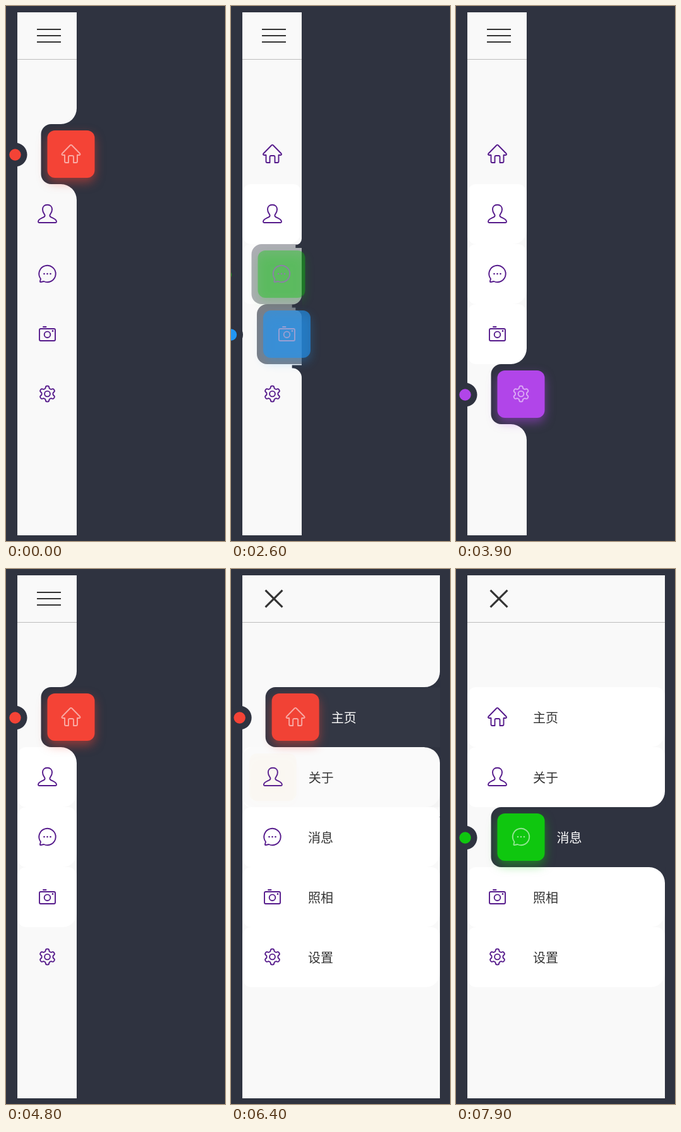
Recreate the animation shown at these times as an HTML page with a canvas. Size 347 px wide and 847 px high, loop 8000 ms.

```html
<!DOCTYPE html>
<html lang="zh">
<head>
<meta charset="utf-8">
<style>
html, body { margin: 0; width: 100%; height: 100%; overflow: hidden; background: #2f3340; }
canvas { display: block; width: 347px; height: 847px; }
</style>
</head>
<body>
<canvas id="stage"></canvas>
<script>
const DARK = '#2f3340', LEFT = 18, TOP = 187, ROW = 95, SHIFT = 37.5;
const LOOP = 8000, FRAME = 100;
const moves = [[800, 1200, 1], [1700, 2200, 2], [2400, 3000, 3], [3400, 3900, 4],
               [4300, 4800, 0], [6400, 6900, 1], [7300, 7900, 2]];
const OPEN = [5200, 5600];

// Icon paths are centred on 0,0
const gear = () => {
  let d = '';
  for (let i = 0; i < 120; i++) {
    const a = i * Math.PI / 60, r = 10.7 + 1.8 * Math.tanh(2 * Math.cos(6 * (a - Math.PI / 2)));
    d += (i ? 'L' : 'M') + r * Math.cos(a) + ' ' + r * Math.sin(a);
  }
  return d + 'Z' + dot(0, 0, 4.4);
};
const dot = (x, y, r) => `M${x + r} ${y}A${r} ${r} 0 1 1 ${x - r} ${y}A${r} ${r} 0 1 1 ${x + r} ${y}Z`;
const items = [
  { name: '主页', color: '#f44336', path: 'M-10 2H-13Q-15.5 1.5-14-.5L-1.3-13.5Q0-14.8 1.3-13.5L14-.5Q15.5 1.5 13 2H10V12Q10 14 8 14H4V5Q4 3 2 3H-2Q-4 3-4 5V14H-8Q-10 14-10 12Z' },
  { name: '关于', color: '#ffa117', path: 'M0-14.2C5-14.2 7.5-11 7.5-7C7.5-2 5-.5 4 2C3 5 6 5.5 9 6.8C13 8.5 14.5 10 14.5 12.6Q14.5 14 13 14H-13Q-14.5 14-14.5 12.6C-14.5 10-13 8.5-9 6.8C-6 5.5-3 5-4 2C-5-.5-7.5-2-7.5-7C-7.5-11-5-14.2 0-14.2Z' },
  { name: '消息', color: '#0fc70f', path: 'M-10.5 8A13.2 13.2 0 1 1-5.5 12L-10.5 13Q-12 13-11.5 11.5Z', fill: dot(-5, 0, 1.3) + dot(0, 0, 1.3) + dot(5, 0, 1.3) },
  { name: '照相', color: '#2196f3', path: 'M-10.5-8H10.5Q12.5-8 12.5-6V9Q12.5 11 10.5 11H-10.5Q-12.5 11-12.5 9V-6Q-12.5-8-10.5-8ZM-6.5-11H-2' + dot(0, 1.2, 4.8), fill: dot(8.5, -4.5, 1.4) },
  { name: '设置', color: '#b145e9', path: gear() }
];
for (const it of items) {
  it.line = new Path2D(it.path);
  it.solid = new Path2D(it.fill || '');
}

const canvas = document.getElementById('stage'), c = canvas.getContext('2d');
const dpr = window.devicePixelRatio || 1;
canvas.width = 347 * dpr;
canvas.height = 847 * dpr;

// The CSS "ease" curve: cubic-bezier(.25, .1, .25, 1)
function ease(u) {
  if (u <= 0) return 0;
  if (u >= 1) return 1;
  let lo = 0, hi = 1;
  for (let i = 0; i < 20; i++) {
    const s = (lo + hi) / 2, v = 1 - s;
    if (.75 * v * v * s + .75 * v * s * s + s * s * s < u) lo = s; else hi = s;
  }
  const v = 1 - lo;
  return .3 * v * v * lo + 3 * v * lo * lo + lo * lo * lo;
}
const progress = (t, from, to) => ease((t - from + 20) / (to - from + 20));
const mix = (a, b, p) => a + (b - a) * p;

function rect(x, y, w, h, color, radii = 0) {
  c.fillStyle = color;
  c.beginPath();
  c.roundRect(x, y, w, h, radii);
  c.fill();
}
function disc(x, y, r, color) {
  c.fillStyle = color;
  c.beginPath();
  c.arc(x, y, r, 0, 7);
  c.fill();
}

// Rounded cut above (dir -1) or below (dir 1) the active row
function corner(right, y, dir, p) {
  const r = 25 * p, band = 20 * p * (1 - p);
  c.fillStyle = DARK;
  c.beginPath();
  c.moveTo(right - r, y - dir * band);
  c.lineTo(right - r, y);
  c.arcTo(right, y, right, y + dir * r, r);
  c.lineTo(right + .5, y + dir * r);
  c.lineTo(right + .5, y - dir * band);
  c.fill();
}

function menuButton(open) {
  c.fillStyle = '#333';
  for (const k of [-1, 0, 1]) {
    c.save();
    c.translate(68, 47 + 10 * k * (1 - open));
    c.rotate(-k * open * Math.PI / 4);
    c.globalAlpha = k ? 1 : 1 - open;
    const h = 2 + open;
    c.fillRect(-19, -h / 2, 38, h);
    c.restore();
  }
}

function drawItem(it, i, p, right, open) {
  const y = TOP + i * ROW, x = LEFT + SHIFT * p;
  if (p > 0) {
    c.globalAlpha = p;
    rect(x, y, right - x, ROW, DARK, [16, 0, 0, 16]);
    c.globalAlpha = 1;
    corner(right, y + 2 * (1 - p), -1, p);
    corner(right, y + ROW + 16 * (1 - p), 1, p);
    c.save();
    c.globalAlpha = p;
    c.shadowColor = it.color + '80';
    c.shadowBlur = 16 * dpr;
    c.shadowOffsetY = 7 * dpr;
    rect(x + 10, y + 10, 75, 75, it.color, 12);
    c.restore();
    disc(x - 41, y + 48.5, 19, DARK);
    disc(x - 41, y + 48.5, 9.2, it.color);
  }

  c.save();
  c.translate(x + 47.5, y + 47);
  c.strokeStyle = c.fillStyle = `rgba(${mix(85, 255, p)},${mix(26, 255, p)},${mix(139, 255, p)},${mix(1, .55, p)})`;
  c.lineWidth = 1.9;
  c.lineCap = c.lineJoin = 'round';
  c.stroke(it.line);
  c.fill(it.solid);
  c.restore();

  if (open > 0) {
    const g = mix(51, 255, p);
    c.save();
    c.beginPath();
    c.rect(LEFT, y, right - LEFT, ROW);
    c.clip();
    c.globalAlpha = open;
    c.fillStyle = `rgb(${g},${g},${g})`;
    c.fillText(it.name, x + 104, y + 48.5);
    c.restore();
  }
}

function draw(t) {
  const open = progress(t, ...OPEN), right = mix(112, 331, open);
  const active = [1, 0, 0, 0, 0], lit = [];
  let last = 0;
  for (const [from, to, next] of moves) {
    if (t < from) break;
    const e = progress(t, from, to);
    active[last] = 1 - e;
    active[next] = e;
    if (open || last % 4) lit[last] = right;
    last = next;
  }

  c.setTransform(dpr, 0, 0, dpr, 0, 0);
  c.font = '20px "Noto Sans CJK SC", "Noto Sans CJK", sans-serif';
  c.textBaseline = 'middle';
  rect(0, 0, 347, 847, DARK);
  rect(LEFT, 10, right - LEFT, 828, '#f9f9f9');
  rect(LEFT, 84, right - LEFT, 1, '#bdbdbd');
  menuButton(open);
  lit.forEach((edge, i) => {
    c.globalAlpha = 1 - active[i];
    rect(LEFT, TOP + i * ROW, edge - LEFT, ROW, '#fff', [14, 14, 22, 14]);
  });
  c.globalAlpha = 1;
  items.forEach((it, i) => drawItem(it, i, active[i], right, open));
}

const start = performance.now();
function tick() {
  const t = (performance.now() - start) % LOOP;
  draw(Math.floor(t / FRAME) * FRAME);
  requestAnimationFrame(tick);
}
tick();
</script>
</body>
</html>
```
